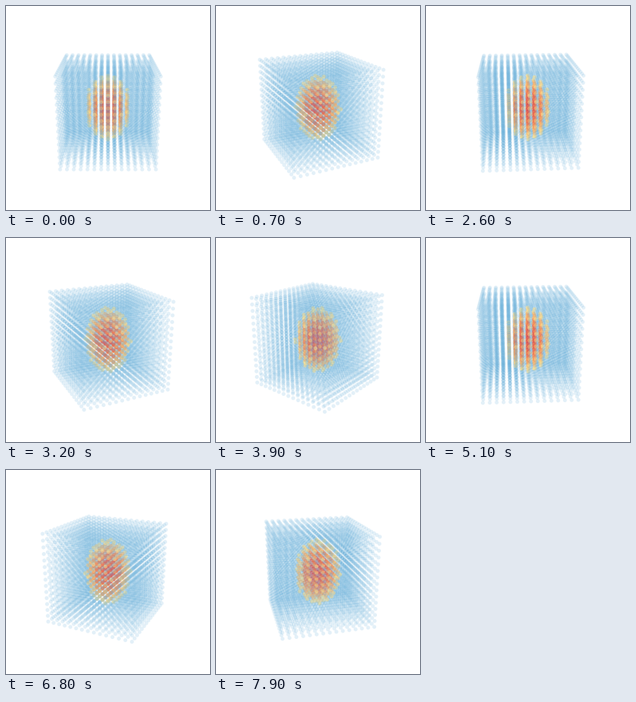
Animation, 256 px wide and 256 px high, one loop 8000 ms. Source, as a matplotlib script:

```python
import numpy as np
import matplotlib.pyplot as plt
from matplotlib.animation import FuncAnimation

SIZE, FRAMES, INTERVAL = 256, 80, 100
N = 15                      # points along each side
DIST, FOCAL = 8.0, 445.0    # camera distance in half cubes, focal length in px
ELEV = np.radians(20)
TURN = np.radians(3.6)      # rotation per frame
RADIUS = 2.45               # marker radius in px

axis = np.linspace(-1, 1, N)
x, y, z = (a.ravel() for a in np.meshgrid(axis, axis, axis))


def point_colors():
    """Warm, dense ellipsoid inside a faint blue lattice."""
    cell = (N - 1) / 2
    q = ((x**2 + y**2) / 3.65**2 + z**2 / 5.3**2) * cell**2
    inside = q <= 1
    rgba = np.empty((x.size, 4))
    rgba[:] = (0.37, 0.67, 0.85, 0.17)
    rgba[inside] = plt.cm.Spectral(0.09 + 0.32 * q[inside])
    rgba[inside, 3] = 0.62
    return rgba


def project(angle):
    """Screen positions and depth towards the camera."""
    c, s = np.cos(angle), np.sin(angle)
    right, front = x * c + y * s, y * c - x * s
    depth = front * np.cos(ELEV) + z * np.sin(ELEV)
    up = z * np.cos(ELEV) - front * np.sin(ELEV)
    scale = FOCAL / (DIST - depth)
    mid = SIZE / 2
    return np.column_stack([mid + right * scale, mid - up * scale]), depth


colors = point_colors()

fig = plt.figure(figsize=(SIZE / 100, SIZE / 100), dpi=100, facecolor="white")
ax = fig.add_axes([0, 0, 1, 1])
ax.set(xlim=(0, SIZE), ylim=(SIZE, 0))
ax.axis("off")
dots = ax.scatter(x, y, s=(2 * RADIUS * 0.72) ** 2, c=colors, linewidths=0)


def update(i):
    pos, depth = project(i * TURN)
    order = np.argsort(depth, kind="stable")
    dots.set_offsets(pos[order])
    dots.set_facecolors(colors[order])
    return (dots,)


anim = FuncAnimation(fig, update, frames=FRAMES, interval=INTERVAL,
                     init_func=lambda: update(0), repeat=True, repeat_delay=0)
plt.show()
```
